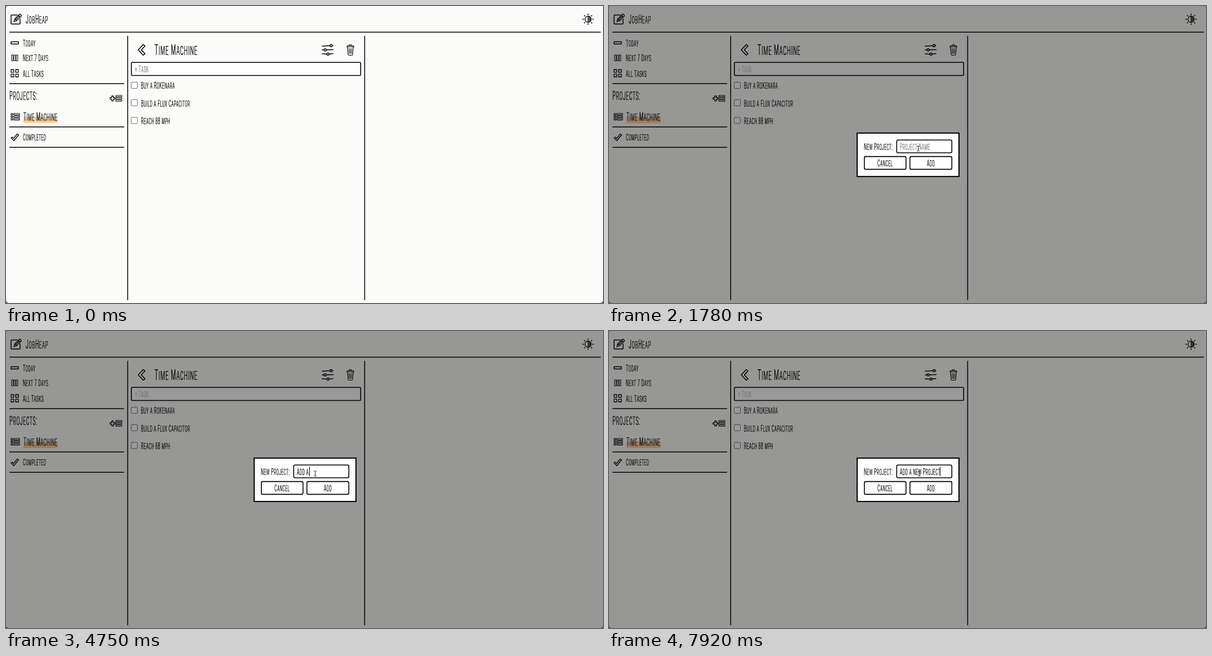
Animation of 1061 by 528 pixels, one loop 8000 ms. Source, as an HTML page:

```html
<!DOCTYPE html>
<html lang="en">
<head>
<meta charset="utf-8">
<title>Task list</title>
<style>
  html, body { margin: 0; width: 1061px; height: 528px; overflow: hidden; background: #444; }
  #stage { position: relative; width: 1061px; height: 528px; overflow: hidden;
    background: #fbfbf9; border-radius: 3px 0 5px 5px; font-family: Roboto, "Open Sans", sans-serif; }
  svg { position: absolute; left: 0; top: 0; width: 1061px; height: 528px;
    fill: none; stroke: #000; stroke-width: 1.5; stroke-linecap: round; stroke-linejoin: round; }
  /* one condensed lettering style for every label */
  .label { position: absolute; line-height: 0; white-space: pre; color: #000; font-weight: 300;
    letter-spacing: .095em; transform: scaleX(.4); transform-origin: 0 0; text-shadow: .9px 0 currentColor; }
  .label small { font-size: .9em; text-transform: uppercase; }
  .hint { color: #757575; }
  .box { fill: #fff; stroke-width: 1.6; }
  .check { fill: #fff; stroke: #767676; stroke-width: 1; }
  #mark { position: absolute; left: 31px; top: 197px; width: 61px; height: 11px; background: #fbd09c; }
  #modal { position: absolute; inset: 0; background: rgba(0, 0, 0, .4); }
  #caret { position: absolute; top: 241px; width: 1px; height: 17px; background: #000; }
</style>
</head>
<body>
<div id="stage">
  <div id="mark"></div>
  <svg viewBox="0 0 1061 528">
    <path stroke-linecap="butt" d="M6 46.500H1057M216.300 53V523M637.400 53V523M6 138H210M6 215H210M6 251.300H210"/>
    <rect class="box" x="222.800" y="100.300" width="407.500" height="23.200" rx="1.500"/>
    <rect class="check" x="222.500" y="135.500" width="11" height="11" rx="1.500"/>
    <rect class="check" x="222.500" y="166.500" width="11" height="11" rx="1.500"/>
    <rect class="check" x="222.500" y="198" width="11" height="11" rx="1.500"/>
    <!-- edit -->
    <path d="M20 16H10Q9 16 9 17V31Q9 32 10 32H24Q25 32 25 31V23"/>
    <path d="M14 28L15.500 23L24 14.500Q26 14 27.500 17.500L19 26ZM15.500 23L19 26M22 17L25 20M17.500 24L24 17.500" stroke-width="1.300"/>
    <!-- brightness -->
    <circle cx="1034.500" cy="23.500" r="5.500" stroke-width="1.300"/>
    <path d="M1034.500 18V29M1036.500 19.500V28M1038.500 21V26" stroke-width="1.300"/>
    <g id="rays"></g>
    <!-- views -->
    <rect x="9" y="63.500" width="13" height="4" rx=".5"/>
    <path d="M10.300 87h2.400v10.500h-2.400zM14.400 87h2.400v10.500h-2.400zM18.500 87h2.400v10.500h-2.400z" stroke-width="1"/>
    <path d="M9 113h4.800v4.800h-4.800zM17.200 113h4.800v4.800h-4.800zM9 121.200h4.800v4.800h-4.800zM17.200 121.200h4.800v4.800h-4.800z" stroke-width="1.300"/>
    <!-- add project -->
    <path d="M188 160h2.800v3h3v2.800h-3v3h-2.800v-3h-3v-2.800h3z" stroke-width="1.300"/>
    <path d="M195.500 159h10.500v2.300h-10.500zM195.500 163h10.500v2.300h-10.500zM195.500 167h10.500v2.300h-10.500z" stroke-width="1"/>
    <!-- project -->
    <path d="M9 191h3v2.600h-3zM9 195.500h3v2.600h-3zM9 200h3v2.600h-3zM14 191h10v2.600h-10zM14 195.500h10v2.600h-10zM14 200h10v2.600h-10z" stroke-width="1.100"/>
    <!-- completed -->
    <path d="M9 234.500L11 233L13.500 235.500L20 227.500L22.500 229L14 239.500Z" stroke-width="1.300"/>
    <!-- back -->
    <path d="M244 68.500L235 78L244 87.500L247 85L240.500 78L247 71Z"/>
    <!-- filters -->
    <path d="M562 71.500L575.500 70.500M580 70.500H581M562 78H565M569.500 78L581.500 77.500M562 85L570 85.500M574.500 85.500L581 84.500"/>
    <circle cx="577.700" cy="70.500" r="2"/><circle cx="567.200" cy="78" r="2"/><circle cx="572.200" cy="85.500" r="2"/>
    <!-- delete -->
    <path d="M605.500 72.500H618.500M606 72Q606 70.500 608 70.500H616Q618 70.500 618 72M609.500 70Q610 68.500 612 68.500Q614 68.500 614.500 70M607 73L608 86Q608 87.500 610 87.500H614Q616 87.500 616 86L617 73" stroke-width="1.200"/>
    <path d="M609.800 75.500L610.200 84.500M612 75.500V84.500M614.200 75.500L613.800 84.500" stroke-width=".9"/>
    <rect id="ring" x="180" y="149" width="31.500" height="30.500" rx="12" pathLength="17" stroke-width="3.700" stroke-dasharray="0 1"/>
  </svg>

  <div id="modal">
    <svg viewBox="0 0 1061 528">
      <rect class="box" x="441" y="225.900" width="181" height="77.200" style="stroke-width:2;stroke-linejoin:miter"/>
      <rect class="box" x="511.300" y="238.200" width="98" height="22.800" rx="2.500"/>
      <rect class="box" x="453.800" y="267.600" width="74" height="22.800" rx="2.500"/>
      <rect class="box" x="534.800" y="267.600" width="74.500" height="22.800" rx="2.500"/>
    </svg>
    <div id="caret"></div>
  </div>

  <svg viewBox="0 0 1061 528">
    <path id="arrow" d="M0 0V11.500L2.700 9L4.500 13L6.500 12.100L4.700 8.200H8.300Z" fill="#fff" stroke="#333" stroke-width=".8"/>
    <path id="beam" d="M-2 -4.500H-.6L0 -4L.6 -4.500H2M0 -4V4M-2 4.500H-.6L0 4L.6 4.500H2" stroke="#222" stroke-width="1"/>
  </svg>
</div>

<script>
const LOOP = 8000, OPEN = 1230, BEAM = 1780, BLINK = 525;
const $ = id => document.getElementById(id);
const stage = $('stage'), modal = $('modal');

// Capitals at full size, lowercase letters as slightly smaller capitals.
const smallCaps = s => s.replace(/[a-z]+/g, '<small>$&</small>');

function label(parent, x, baseline, size, text, hint) {
  const el = document.createElement('div');
  el.className = hint ? 'label hint' : 'label';
  el.style.cssText = `left:${x}px;top:${baseline - .342 * size}px;font-size:${size}px`;
  el.innerHTML = smallCaps(text);
  parent.append(el);
  return el;
}

label(stage, 35, 31, 21.2, 'JobHeap');
label(stage, 29.5, 71.5, 17, 'Today');
label(stage, 29.5, 98, 17, 'Next 7 Days');
label(stage, 29.5, 125.5, 17, 'All Tasks');
label(stage, 5.5, 167.5, 22.7, 'Projects:');
label(stage, 31, 204, 20, 'Time Machine');
label(stage, 29.5, 239, 17, 'Completed');
label(stage, 264, 86.5, 25.4, 'Time Machine');
label(stage, 229, 118, 17, '+ Task', true);
label(stage, 239.5, 147, 17, 'Buy a RoKenara');
label(stage, 239.5, 178.5, 17, 'Build a Flux Capacitor');
label(stage, 239.5, 209.5, 17, 'Reach 88 mph');
label(modal, 453, 256, 17, 'New Project:');
label(modal, 477, 285, 17, 'Cancel');
label(modal, 564.5, 285, 17, 'Add');
const hint = label(modal, 516.5, 256, 17, 'Project Name', true);
const typed = label(modal, 516.5, 256, 17, '');

for (let i = 0; i < 8; i++) {
  const ray = document.createElementNS('http://www.w3.org/2000/svg', 'path');
  ray.setAttribute('d', 'M8 0H9.500');
  ray.setAttribute('transform', `translate(1034.5 23.5) rotate(${i * 45})`);
  $('rays').append(ray);
}

const name = 'Add a new Project';
const keyTimes = [2560, 2830, 3100, 3300, 3500, 3700, 4860, 4970, 5080,
  5280, 5740, 6130, 6200, 6400, 6470, 6670, 6870];
const path = [[130, 966, 514], [300, 760, 400], [500, 440, 255], [700, 250, 185], [900, 199, 167],
  [1100, 195, 163], [1200, 197, 165], [1370, 205, 168], [1500, 330, 205], [1640, 560, 262], [1710, 598, 273]];
const ringFade = [[830, 0], [1000, 1], [OPEN - 1, 1], [OPEN, .22], [1400, 0]];

function track(keys, t) {
  if (t <= keys[0][0]) return keys[0].slice(1);
  const i = keys.findIndex(k => k[0] > t);
  if (i < 0) return keys[keys.length - 1].slice(1);
  const a = keys[i - 1], b = keys[i], u = (t - a[0]) / (b[0] - a[0]);
  return a.slice(1).map((v, j) => v + (b[j + 1] - v) * u);
}

const show = (el, on) => { el.style.visibility = on ? 'visible' : 'hidden'; };
let shown = -1;

function draw(t) {
  const step = Math.floor(t * .015 + .01) / .015; // pointer moves at 15 steps a second
  const [x, y] = track(path, step);
  $('arrow').setAttribute('transform', `translate(${x} ${y})`);
  show($('arrow'), t >= 130 && t < BEAM);
  $('beam').setAttribute('transform', `translate(${t < 7850 ? 549.5 : 551.5} 253.5)`);
  show($('beam'), t >= BEAM);
  $('ring').style.opacity = track(ringFade, t)[0];

  modal.style.display = t >= OPEN ? 'block' : 'none';
  if (t < OPEN) return;
  const count = keyTimes.filter(k => k <= t).length;
  if (count !== shown) {
    shown = count;
    typed.innerHTML = smallCaps(name.slice(0, count));
    show(hint, !count);
    $('caret').style.left = 516 + typed.getBoundingClientRect().width + 'px';
  }
  const last = count ? keyTimes[count - 1] : OPEN;
  show($('caret'), Math.floor((t - last) / BLINK) % 2 === 0);
}

function frame() {
  draw(performance.now() % LOOP);
  requestAnimationFrame(frame);
}
frame();
</script>
</body>
</html>
```
